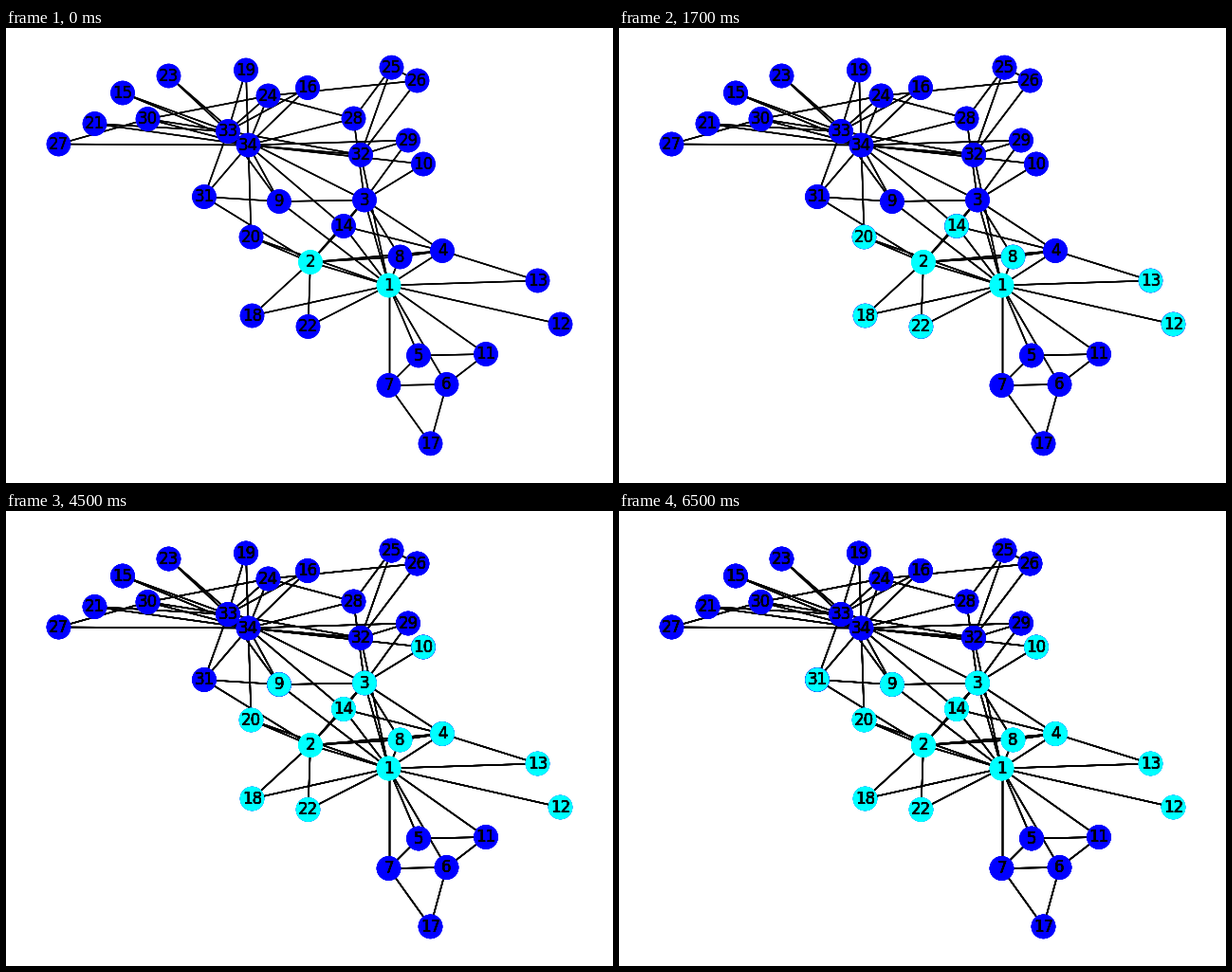
Recreate the animation shown at these times as a matplotlib script. Size 640 by 480 pixels, loop 8000 ms.

```python
from itertools import combinations

import matplotlib.pyplot as plt
from matplotlib.animation import FuncAnimation
from matplotlib.collections import LineCollection

WIDTH, HEIGHT, DPI = 640, 480, 100
INTERVAL, FRAMES = 500, 16
FIRST_PASSES = 3  # drawings already stacked when the loop starts
LABEL_DROP = 0.4

# Node centres in pixels from the top left, for nodes 1, 2, 3, ...
POINTS = [
    (403.5, 271.5), (321, 247), (378, 181.5), (460, 235), (435, 345.5),
    (464.5, 376), (403.5, 377), (415.5, 241.5), (288, 183), (440, 143.5),
    (506, 344), (584.5, 312.5), (560.5, 266.5), (356, 209), (123, 68.5),
    (318, 63), (447.5, 438.4), (259.5, 303.5), (253, 44.5), (258.5, 220.5),
    (93.5, 101), (318.5, 315), (171.5, 50.5), (276.5, 71.5), (406.5, 41.6),
    (433.5, 55.5), (55.5, 122.5), (366.5, 95.5), (424, 118.5), (149.5, 96),
    (209, 178), (374, 133.8), (234, 109), (255.5, 123.5),
]

# Nodes reached at each step of the spread
SPREAD = [{1, 2}, {8, 12, 13, 14, 18, 20, 22}, {3, 4}, {9, 10}, {31}]


def clique(*members):
    return set(combinations(sorted(members), 2))


def star(hub, *spokes):
    return {tuple(sorted((hub, spoke))) for spoke in spokes}


def build_links():
    """Join tight groups first, then the loose ties between them."""
    groups = [(1, 2, 3, 4, friend) for friend in (8, 14)]
    groups += [(1, 2, friend) for friend in (18, 20, 22)]
    groups += [(1, a, b) for a in (5, 6) for b in (7, 11)]
    groups += [(33, 34, friend) for friend in (*range(15, 24, 2), 16, 32)
               if friend != 17]
    groups += [(9, 31, 33, 34), (24, 30, 33, 34), (1, 3, 9), (1, 4, 13),
               (6, 7, 17), (24, 28, 34), (25, 26, 32), (27, 30, 34),
               (29, 32, 34)]
    ties = [star(1, 12, 32), star(2, 31), star(3, 10, 28, 29, 33),
            star(24, 26), star(25, 28), star(34, 10, 14, 20)]
    return set().union(*(clique(*group) for group in groups), *ties)


fig = plt.figure(figsize=(WIDTH / DPI, HEIGHT / DPI), dpi=DPI, facecolor="white")
ax = fig.add_axes([0, 0, 1, 1])
ax.set_xlim(0, WIDTH)
ax.set_ylim(HEIGHT, 0)
ax.axis("off")

segments = [(POINTS[a - 1], POINTS[b - 1]) for a, b in sorted(build_links())]


def draw_graph(reached):
    """Draw one pass of the network and return its artists."""
    edges = ax.add_collection(
        LineCollection(segments, colors="black", linewidths=1, zorder=1))
    colors = ["cyan" if node in reached else "blue"
              for node in range(1, len(POINTS) + 1)]
    nodes = ax.scatter(*zip(*POINTS), s=300, c=colors, zorder=2)
    labels = [ax.text(x, y + LABEL_DROP, str(node), fontsize=12,
                      family="DejaVu Sans", ha="center", va="center", zorder=3)
              for node, (x, y) in enumerate(POINTS, start=1)]
    return [edges, nodes, *labels]


def build_passes():
    """Later passes lie over earlier ones, so edges and text grow heavier."""
    passes, reached = [], set()
    for step, new_nodes in enumerate(SPREAD):
        reached |= new_nodes
        for _ in range(1 if step else FIRST_PASSES):
            passes.append(draw_graph(reached))
    return passes


passes = build_passes()


def update(frame):
    step = (frame + 3) // 4
    for index, artists in enumerate(passes):
        for artist in artists:
            artist.set_visible(index < FIRST_PASSES + step)
    return [artist for artists in passes for artist in artists]


animation = FuncAnimation(fig, update, frames=FRAMES, interval=INTERVAL,
                          repeat=True, repeat_delay=0, blit=False)
plt.show()
```
